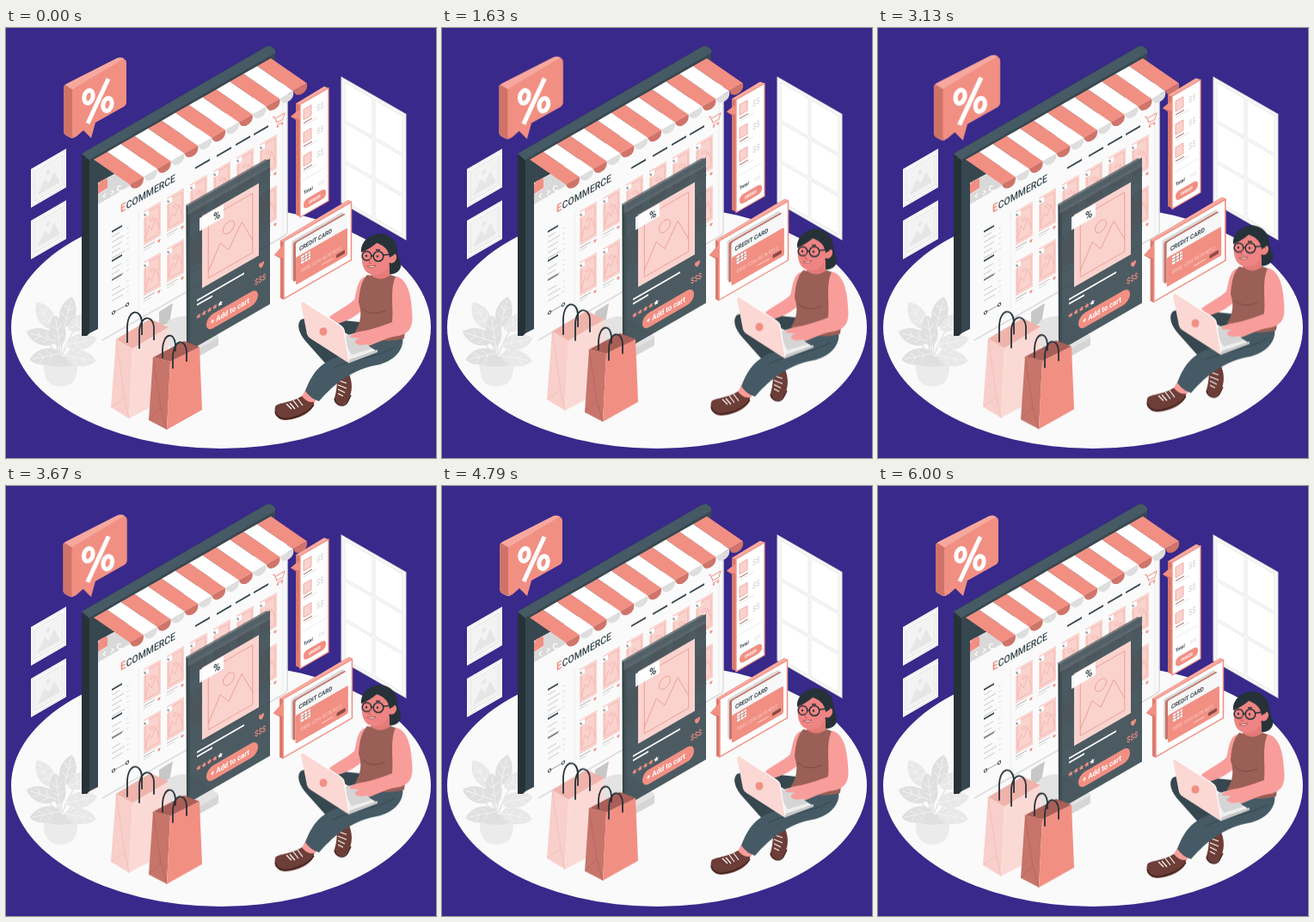
Write an HTML page that moves like this. It is 500 by 500 pixels and loops after 6.04 s.

```html
<!DOCTYPE html>
<html lang="en">
<head>
<meta charset="utf-8">
<title>Online shopping</title>
<style>
html, body { margin: 0; width: 100%; height: 100%; overflow: hidden; background: #38298b; }
svg { display: block; width: 100vw; height: 100vh; }
text { font-family: Roboto, Inter, sans-serif; }
.float { animation: float 6.04s linear infinite; --rise: -10px; }
.bags { animation-duration: 3.02s; }
.phone { animation-duration: 1.51s; --rise: -8.5px; }
.pulse { animation: pulse 6.04s linear infinite; }
#badge { transform-origin: 104px 82px; }
#card { transform-origin: 360px 258px; }
@keyframes float { 50% { transform: translateY(var(--rise)); } }
@keyframes pulse {
  0%, 33.1%, 66.2%, 100% { transform: scale(1); }
  16.6%, 50.2% { transform: scale(1.065); }
}
</style>
</head>
<body>
<svg viewBox="0 0 500 500">
  <ellipse cx="250" cy="348" rx="244" ry="141" fill="#fafafa"/>
  <g id="walls"></g>

  <g id="plant">
    <path d="M44 388Q43 408 52 414Q63 420 75 414Q84 408 83 388Z" fill="#ebebeb"/>
    <ellipse cx="63.5" cy="388" rx="19.5" ry="6" fill="#e0e0e0"/>
    <g id="leaves"></g>
  </g>

  <g id="monitor">
    <path d="M178 330L194 320L190 343L178 347Z" fill="#c7c7c7"/>
    <path d="M188 341Q205 330 222 340L247 358V368L215 386L180 365Z" fill="#e3e3e3"/>
    <path d="M215 378L247 360V369L215 387Z" fill="#d6d6d6"/>
    <path d="M88 149Q88 146 91 144L302 22Q306 20 309 22L313 25V34L98 158V354L94 358L88 358Z" fill="#263238"/>
    <path d="M88 146L302 22Q306 20 309 22L313 25V30L97 154Z" fill="#455a64"/>
    <path d="M97 153L313 29V245L97 355Z" fill="#37474f"/>
    <path d="M107 180L327 60V236Q327 240 323 242L112 363Q107 364 107 359Z" fill="#fafafa"/>
    <path d="M327 76V236Q327 240 323 242L112 363" fill="none" stroke="#dcdcdc" stroke-width="1.5"/>
    <path d="M322 82V240" stroke="#ececec"/>
    <path d="M118 174L150 160V180L107 205V193L118 187Z" fill="#d9d9d9"/>
    <path d="M107 183Q107 180 110 178L116 175Q118 174 118 177V186L107 193Z" fill="#f28f83"/>
    <g fill="none" stroke="#fff" stroke-width="1.2">
      <path d="M116 192l-3 4 3 1M122 189l3 1-3 4M134 184a3 3 0 1 0 1 4"/>
    </g>
    <g id="page"></g>
    <g id="awning"></g>
  </g>

  <g id="badge" class="pulse">
    <path d="M67 70Q67 66 72 64L129 35Q134 33 138 36L79 73V128L76 128L70 125Q67 123 67 119Z" fill="#f7a89e"/>
    <path d="M67 69Q67 66 70 67L78 72V128L70 125Q67 123 67 119Z" fill="#cf7369"/>
    <path d="M77 75Q77 71 81 69L133 38Q140 34 140 41V86Q140 90 136 92L104 110L99 128L90 119L82 126Q77 129 77 123Z" fill="#f28f83"/>
    <g fill="none" stroke="#fff" stroke-width="5">
      <path d="M119 59L95 111"/>
      <ellipse cx="96" cy="80" rx="5" ry="7.500" transform="rotate(15 96 80)"/>
      <ellipse cx="118" cy="89" rx="5" ry="7.500" transform="rotate(15 118 89)"/>
    </g>
  </g>

  <g id="list" class="float"></g>
  <g id="card" class="pulse"></g>
  <g id="phone" class="float phone"></g>

  <g class="float bags">
    <path d="M128 362L168 338L189 348L147 373Z" fill="#efb3ab"/>
    <path d="M141 366V347C142 326 157 326 158 342V357" fill="none" stroke="#263238" stroke-width="1.8"/>
    <path d="M128 362L147 373L143 454L122 441Z" fill="#f8cfca"/>
    <path d="M147 373L189 348L187 431L143 454Z" fill="#fbdad6"/>
    <path d="M128 362L138 430L122 441M138 430L143 454" fill="none" stroke="#f2beb7" stroke-width=".8"/>
    <path d="M155 373V353C156 333 171 333 172 348V363" fill="none" stroke="#263238" stroke-width="1.8"/>
    <path d="M171 383L207 364L225 371L191 388Z" fill="#a95f57"/>
    <path d="M182 384V373C183 354 196 353 197 368V376" fill="none" stroke="#263238" stroke-width="1.8"/>
    <path d="M171 383L191 388L187 467L166 456Z" fill="#c7746a"/>
    <path d="M191 388L225 371L228 444L187 467Z" fill="#f28f83"/>
    <path d="M171 383L180 442L166 456M180 442L187 467" fill="none" stroke="#b3675e" stroke-width=".8"/>
    <path d="M194 396V382C195 361 209 361 210 376V388" fill="none" stroke="#263238" stroke-width="1.8"/>
  </g>

  <g class="float">
    <!-- far leg and shoe -->
    <path d="M384 400L396 396L400 408L386 410Z" fill="#f99d9b"/>
    <path d="M385 402Q391 406 398 400C403 411 404 423 397 434C391 442 382 439 382 430C385 421 385 412 385 402Z" fill="#6d3d37"/>
    <path d="M382 431C383 439 392 442 397 435L401 427" fill="none" stroke="#43231f" stroke-width="1.5"/>
    <path d="M387 410l9 3M386 415l10 4M386 420l8 4M386 425l6 3" stroke="#fff" stroke-width="1.2"/>
    <path d="M412 342C385 339 352 334 343 339C337 345 341 356 350 366L383 403Q392 405 398 397L386 378L430 372Z" fill="#37474f"/>
    <!-- near leg and shoe -->
    <path d="M348 421L362 430L356 440L342 432Z" fill="#f99d9b"/>
    <path d="M313 441C314 435 330 437 344 428Q350 436 358 435C359 444 344 455 324 456C315 456 311 447 313 441Z" fill="#6d3d37"/>
    <path d="M313 446C315 457 329 455 340 451Q354 445 358 438" fill="none" stroke="#43231f" stroke-width="1.5"/>
    <path d="M326 437l6 6M330 436l6 7M334 433l6 8M339 431l6 8" stroke="#fff" stroke-width="1.2"/>
    <path d="M409 347L461 358C464 374 451 388 431 392C404 397 383 412 364 434Q354 431 348 422C356 401 367 386 392 381L410 371Z" fill="#455a64"/>
    <path d="M452 371C430 384 400 385 380 396" fill="none" stroke="#37474f"/>
    <!-- hair behind the neck -->
    <path d="M414 256C418 238 440 234 450 246C456 252 454 262 458 270C463 281 453 289 440 286L434 255Z" fill="#263238"/>
    <!-- upper body -->
    <path d="M417 289C408 293 408 306 405 316C396 324 383 330 376 336L382 345C397 341 412 333 417 324Z" fill="#f99d9b"/>
    <path d="M425 279L446 275V290Q438 300 424 290Z" fill="#e57b78"/>
    <path d="M420 287L425 288Q436 296 447 287L456 290C466 306 467 334 463 361Q435 369 406 353C413 342 414 331 410 319C411 306 413 294 420 287Z" fill="#9a5f56"/>
    <path d="M414 326Q424 336 441 329" fill="none" stroke="#7d4b44"/>
    <path d="M453 289C464 290 471 305 472 329C474 347 470 355 456 358C440 360 428 369 416 371C406 371 400 366 401 361C405 353 425 352 449 342C451 326 446 304 453 289Z" fill="#f99d9b"/>
    <!-- head -->
    <path d="M414 259C416 248 436 246 445 257L447 264Q455 260 454 268Q452 275 446 273Q442 286 431 287C418 288 412 278 414 259Z" fill="#ee8483"/>
    <path d="M413 261C412 247 425 238 438 240C452 243 454 256 451 264L446 267C445 256 437 252 431 250Q423 257 413 261Z" fill="#263238"/>
    <g fill="none" stroke="#263238" stroke-width="1.5">
      <circle cx="419.500" cy="265" r="5.3"/><circle cx="433" cy="265.500" r="5.8"/>
      <path d="M425 265h2.500M439 264l9-1M416 258l4-1M430 258l5 0"/>
    </g>
    <circle cx="419" cy="265" r="1.2" fill="#263238"/><circle cx="432" cy="265.500" r="1.2" fill="#263238"/>
    <path d="M424 266l-2 7 3 1" fill="none" stroke="#c95f5c"/>
    <path d="M420 277Q426 281 430 276Q425 277 420 277Z" fill="#fff" stroke="#9c4740" stroke-width=".8"/>
    <!-- laptop -->
    <path d="M351 356L385 349L432 376L398 389Z" fill="#efefef"/>
    <path d="M390 359L408 354L425 373L402 380Z" fill="#d5d5d5"/>
    <path d="M398 386L432 374V377L398 390Z" fill="#c9c9c9"/>
    <path d="M343 320Q343 317 346 318L389 346Q392 348 393 351L399 387Q399 390 396 388L354 361Q351 359 350 356Z" fill="#fbd8d4"/>
    <path d="M343 320Q343 317 346 318L389 346Q392 348 393 351L399 387" fill="none" stroke="#fff" stroke-width="1.2"/>
    <ellipse cx="369" cy="353" rx="4.500" ry="4.800" fill="#f28f83"/>
    <path d="M430 351C416 352 405 353 400 358Q399 361 405 360L411 361Q403 364 407 367Q413 371 424 366Z" fill="#f99d9b"/>
  </g>
</svg>
<script>
const coral = '#f28f83', pink = '#fad3ce', dark = '#37474f';
const put = (id, html) => document.getElementById(id).innerHTML += html;
const times = (n, f) => Array.from({ length: n }, (_, i) => f(i)).join('');
const iso = (x, y, html, deg = -30) => `<g transform="translate(${x} ${y}) skewY(${deg})">${html}</g>`;
const rect = (x, y, w, h, fill, more = '') =>
  `<rect x="${x}" y="${y}" width="${w}" height="${h}" fill="${fill}" ${more}/>`;
const path = (d, fill, more = '') => `<path d="${d}" fill="${fill}" ${more}/>`;
const line = (x, y, w, color, width = 1.5) =>
  `<path d="M${x} ${y}h${w}" stroke="${color}" stroke-width="${width}"/>`;
const text = (x, y, size, fill, str, weight = 500) =>
  `<text transform="translate(${x} ${y}) scale(.866 1)" font-size="${size}" font-weight="${weight}" fill="${fill}">${str}</text>`;
const heart = (x, y, s) =>
  path('M0 3C-4 0-3-3-1-3Q0-3 0-1Q0-3 1-3C3-3 4 0 0 3Z', coral, `transform="translate(${x} ${y}) scale(${s})"`);

// framed landscape: border, sun and peaks
const scene = (w, h, fill, ink, width) => rect(0, 0, w, h, fill) +
  `<g fill="none" stroke="${ink}" stroke-width="${width}">` +
  rect(w * .11, h * .09, w * .78, h * .82, 'none') +
  `<circle cx="${w * .47}" cy="${h * .37}" r="${w * .1}"/>` +
  `<path d="M${w * .11} ${h * .82}L${w * .32} ${h * .52}L${w * .47} ${h * .68}L${w * .7} ${h * .4}L${w * .89} ${h * .74}"/></g>`;

// wall pictures and window
const frame = rect(0, 0, 41, 45, '#fafafa') + rect(2, 2, 37, 41, '#fff', 'stroke="#e0e0e0" stroke-width=".8"') +
  rect(4, 5, 33, 35, '#f3f3f3', 'stroke="#dcdcdc" stroke-width=".8"') +
  path('M7 35L16 21L21 28L27 18L34 35Z', '#e6e6e6') + '<circle cx="20" cy="15" r="2.500" fill="#e6e6e6"/>';
put('walls', iso(29, 164, frame) + iso(29, 224, frame) +
  iso(390, 57, rect(0, 0, 75, 146, '#f7f7f7', 'stroke="#e0e0e0"') +
    times(6, i => rect(4 + i % 2 * 35, 4 + (i >> 1) * 47, 32, 44, '#fff', 'stroke="#e6e6e6" stroke-width=".8"')), 30));

// plant leaves: centre and angle, each on a stem from the pot
put('leaves', [[72, 331, 14], [46, 335, -32], [60, 353, -8], [88, 342, 62], [42, 359, -72],
  [87, 365, 78], [46, 382, -102], [86, 384, 100]].map(([x, y, a], i) =>
    `<path d="M63 388Q${(x + 63) / 2} ${y + 8} ${x} ${y}" fill="none" stroke="#dedede" stroke-width="1.2"/>` +
    `<g transform="translate(${x} ${y}) rotate(${a})">` +
    path('M0 18C-13 11-12-10 0-19C12-10 13 11 0 18Z', i % 2 ? '#e8e8e8' : '#e0e0e0') +
    '<path d="M0 18V-15M0 8l7-6M0 8l-7-6M0-2l6-6M0-2l-6-6" fill="none" stroke="#f5f5f5" stroke-width=".8"/></g>').join(''));

// shop page
const product = scene(20, 40, pink, '#f4aca3', .6) + rect(-1, 2, 7, 6, '#fff') + text(0, 7, 5, dark, '%') +
  line(0, 43, 13, '#b0b0b0', .8) + line(0, 46, 9, '#d0d0d0', .8) + heart(18, 45, .6);
put('page',
  iso(133, 215, text(0, 0, 13, coral, 'E', 700) + text(6.8, 0, 12, dark, 'COMMERCE')) +
  [[220, 163], [245, 149], [267, 136], [288, 124]].map(([x, y]) => iso(x, y, line(0, 0, 17, dark, 2.2))).join('') +
  iso(310, 112, `<path d="M0-8h2l3 9h7l2-6H4M5 4h7" fill="none" stroke="${coral}"/>` +
    `<circle cx="6" cy="6" r="1.200" fill="${coral}"/><circle cx="11" cy="6" r="1.2" fill="${coral}"/>`) +
  iso(123, 237, line(0, 0, 12, dark, 2) + line(0, 34, 12, dark, 2) + line(0, 56, 12, dark, 2) +
    times(13, i => [5, 9].includes(i) ? '' : line(0, 6 + i * 6.2, 9 + i * 5 % 7, '#c8c8c8', 1) + line(17, 6 + i * 6.2, 3, '#dcdcdc', 1)) +
    line(0, 95, 20, '#9aa0a3', 1) + `<g fill="#fff" stroke="${dark}"><circle cx="2" cy="95" r="1.6"/><circle cx="18" cy="95" r="1.6"/></g>`) +
  '<path d="M154 212V332" stroke="#eee"/>' +
  times(12, i => { const c = i % 6; return iso(160 + c * 27, 213 - c * 15.6 + (i > 5 ? 59 : 0), product); }));

// awning
const stripe = 206 / 13, drop = stripe * .572;
put('awning', times(13, i => {
  const x = 102 + i * stripe, y = 153 - i * drop, red = i % 2 === 0, bx = x + 42, by = y + 29;
  return path(`M${x} ${y}l${stripe} ${-drop}l42 29l${-stripe} ${drop}Z`, red ? coral : '#fff') +
    path(`M${bx} ${by}l${stripe} ${-drop}q1 7-4 11q-5 4-9 2q-3-2-3-8Z`, red ? '#d0746a' : '#dedede');
}));

// order list
put('list', path('M337 88L370 68L375 70V76L343 93V220L337 217V107L331 103L337 98Z', '#d9796e') +
  path('M331 103L337 98L343 94V107Z', coral) + path('M337 88L370 68L375 70L343 89Z', '#f8aaa0') +
  iso(342, 89, rect(0, 0, 33, 131, '#fff', `stroke="${coral}" stroke-width="1.3"`) +
    times(3, i => { const y = 8 + i * 27;
      return rect(4, y, 9, 12, pink, `stroke="${coral}" stroke-width=".6"`) + text(19, y + 11, 9, '#d0d0d0', '$$', 400) +
        line(4, y + 16, 10, '#a4665e', 1) + line(4, y + 19, 16, '#ddd', .8); }) +
    line(3, 90, 27, '#e5e5e5', .8) + text(4, 107, 5.6, dark, 'Total', 700) + text(21, 107, 5, '#dcdcdc', '$$$') +
    rect(4, 114, 26, 11, coral, 'rx="5"') + text(10, 121.5, 5, '#fff', 'ORDER', 700)));

// payment card
put('card', path('M319 247L398 200L402 202V206L323 252V316L319 314V268L312 264L319 256Z', '#d9796e') +
  path('M312 264L319 256L324 250V268Z', coral) + path('M319 247L398 200L402 202L323 249Z', '#f8aaa0') +
  iso(323, 248, rect(0, 0, 78.5, 67, '#fff', `stroke="${coral}" stroke-width="1.5"`) +
    rect(9, 5, 60, 46, '#dadada', 'rx="2"') + rect(11, 8, 60, 46, '#c7746a', 'rx="2"') +
    rect(14, 10, 60, 49, '#f7f7f7', 'rx="2"') + text(18, 22, 7, dark, 'CREDIT CARD', 700) +
    rect(14, 27, 60, 32, coral, 'rx="2"') + rect(20, 29, 11, 9, '#fff', 'rx="1"') +
    '<path d="M20 32h11M20 35h11M24 29v9M28 29v9" stroke="#b96960" stroke-width=".7"/>' +
    text(20, 48, 5.6, pink, '0000 1234 5678 9012', 400) + line(44, 53, 13, pink, 1) + rect(61, 51, 10, 4, '#8b4d46', 'rx="1"')));

// product screen
const star = (x, fill) => path('M0-3l.9 2 2.1.2-1.6 1.5.5 2.1L0 1.7l-1.9 1.1.5-2.1L-3-.8l2.1-.2Z', fill, `transform="translate(${x} 0)"`);
put('phone', path('M209 206L301 153Q304 152 307 154V159L214 212V374L210 372Z', '#546066', 'opacity=".75"') +
  iso(210, 208, rect(0, 0, 97, 169, dark, 'opacity=".89"') + rect(0, 0, 97, 10, '#7a858a', 'opacity=".35"') +
    '<path d="M.5 0V169" stroke="#2b383e"/>' +
    `<g transform="translate(18 21)">${scene(66, 84, pink, '#ec9388', .7)}</g>` +
    rect(15, 22, 28, 15, '#fff', 'opacity=".95"') + text(31, 35, 13, dark, '%', 700) +
    line(12, 116, 55, '#fff', 2) + line(12, 121, 18, '#fff', 2) + heart(87, 118, 1.1) +
    text(79, 137, 9, coral, '$$$', 500) +
    `<g transform="translate(14 135)">${times(5, i => star(i * 6.3, i < 4 ? coral : '#fff'))}</g>` +
    rect(23, 142, 60, 17, coral, 'rx="8"') + text(28, 153.5, 9, '#fff', '+ Add to cart', 700)));
</script>
</body>
</html>
```
